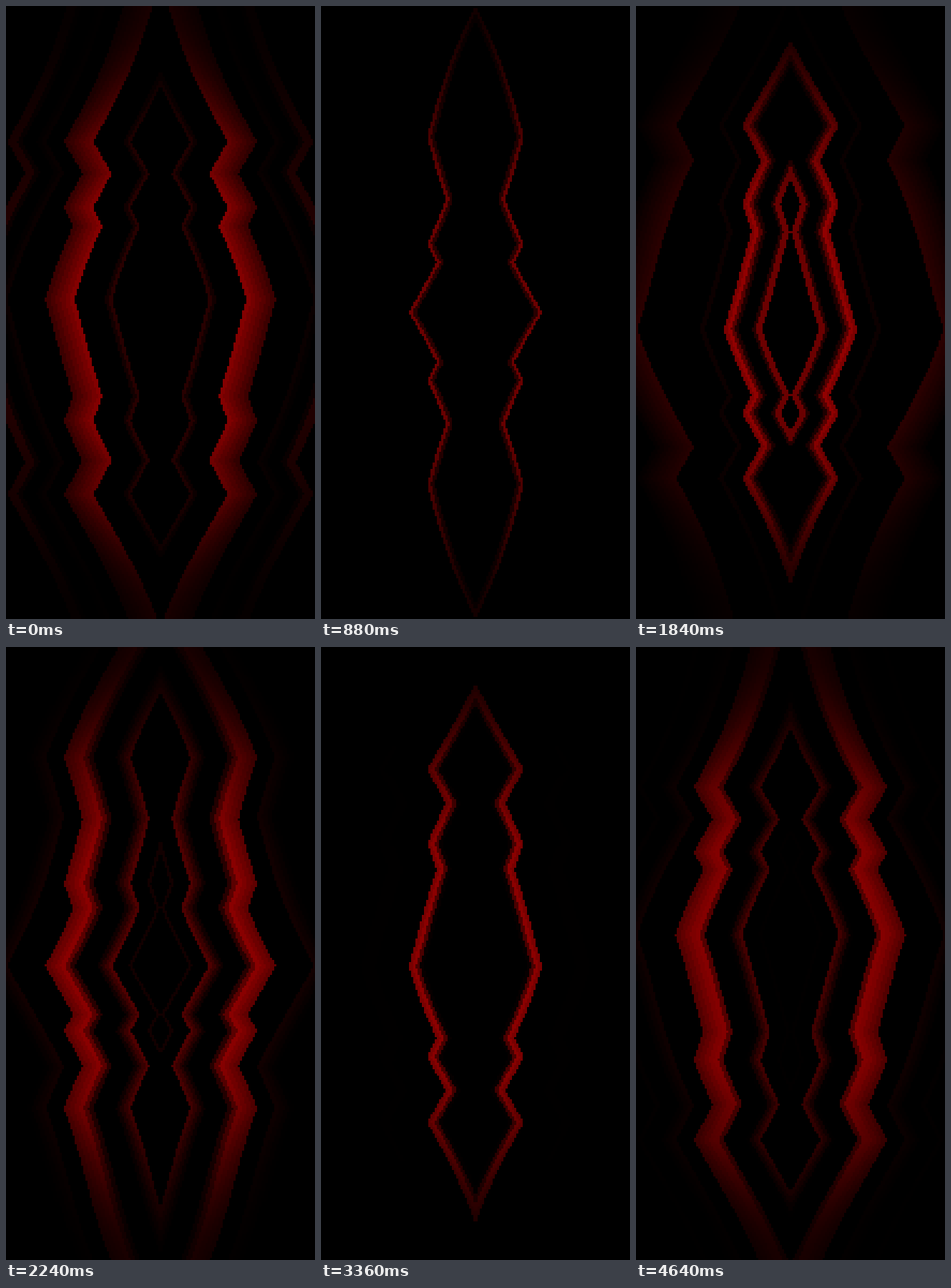
These frames come from a looping animation (432x858 px, 4.72 s). An HTML page with a canvas:

```html
<!DOCTYPE html>
<html lang="en">
<head>
<meta charset="utf-8">
<title>Red pulse</title>
<style>
  html, body { margin: 0; width: 100%; height: 100%; overflow: hidden; background: #000; }
  canvas { display: block; width: 100%; height: 100%; image-rendering: pixelated; }
</style>
</head>
<body>
<canvas id="stage" width="144" height="286"></canvas>
<script>
const W = 144, H = 286, CELL = 3;
const STEP = 80, STEPS = 59, BEAT = STEPS / 2;

// Rings of diamonds: radius range, stripe count, side diamonds [offset, inset]
// and the pulses that run inward through the ring.
const rings = [
  { from: 40, to: 53.5, stripes: 3, sides: [[52, 26]], pulses: [
    { at: 25, speed: .15, level: 150, head: .45, tail: .7 },
    { at: 5.5, speed: .8, level: 10, head: .45, tail: 1 } ] },
  { from: 67.6, to: 93.5, stripes: 5, sides: [[52, 26], [104, 26]], pulses: [
    { at: 25.8, speed: .25, level: 145, head: .5, tail: 1.4 },
    { at: 16.4, speed: .2, level: 165, head: .5, tail: .45 } ] },
  { from: 120, to: 161, stripes: 6, sides: [[52, 26], [104, 26]], pulses: [
    { at: 0, speed: .27, level: 138, head: .45, tail: 1.6 },
    { at: 19.5, speed: .17, level: 130, head: 1, tail: .75, swell: true } ] },
  { from: 214, to: 268, stripes: 8, sides: [[104, 54]], pulses: [
    { at: 3.3, speed: .25, level: 90, head: .2, tail: 1.2, swell: true },
    { at: 22.8, speed: .12, level: 45, head: .6, tail: 1.1, swell: true } ] }
];

const ctx = document.getElementById('stage').getContext('2d');
const img = ctx.createImageData(W, H);
for (let i = 3; i < img.data.length; i += 4) img.data[i] = 255;

const clamp = (n) => Math.max(0, Math.min(1, n));
const wrap = (n, size) => ((n % size) + size) % size;

// Brightness of one pulse at u (0 = inner edge, 1 = outer edge).
function pulseLevel(p, u, step) {
  const age = wrap(step - p.at + BEAT / 2, BEAT) - BEAT / 2;
  const peak = -p.speed * age;
  const shape = clamp(1 - (u < peak ? (peak - u) / p.head : (u - peak) / p.tail));
  return p.level * shape * (p.swell ? clamp(1.2 - peak) : 1);
}

function stripeLevels(ring, step) {
  return Array.from({ length: ring.stripes }, (_, i) => {
    const u = (i + .5) / ring.stripes;
    return Math.max(...ring.pulses.map((p) => pulseLevel(p, u, step)));
  });
}

// Vertical position after the travelling wave has stretched it.
function warp(y, step) {
  const phase = 2 * Math.PI * ((y - 460) / 500 + 3 * step / STEPS);
  return Math.abs(.423 * (y - 428) - 12.4 * Math.sin(phase));
}

function edgeFade(y) {
  const k = clamp((Math.abs(y - 429) - 120) / 310);
  return 1 - .82 * k * k * (3 - 2 * k);
}

function draw(step) {
  const levels = rings.map((ring) => stripeLevels(ring, step));
  for (let row = 0; row < H; row++) {
    const y = (row + .5) * CELL;
    const v = warp(y, step);
    const fade = edgeFade(y);
    const reach = rings.map((ring) =>
      Math.min(v, ...ring.sides.map(([off, inset]) => Math.abs(v - off) + inset)));
    for (let col = 0; col < W / 2; col++) {
      const x = (W / 2 - col - .5) * CELL;
      let red = 0;
      rings.forEach((ring, i) => {
        const u = (x + reach[i] - ring.from) / (ring.to - ring.from);
        if (u >= 0 && u < 1) red = Math.max(red, levels[i][Math.floor(u * ring.stripes)]);
      });
      red *= fade;
      img.data[(row * W + col) * 4] = red;
      img.data[(row * W + W - 1 - col) * 4] = red;
    }
  }
  ctx.putImageData(img, 0, 0);
}

const start = performance.now();
let shown = -1;
function tick() {
  const step = Math.floor((performance.now() - start) / STEP) % STEPS;
  if (step !== shown) draw(shown = step);
  requestAnimationFrame(tick);
}
tick();
</script>
</body>
</html>
```
